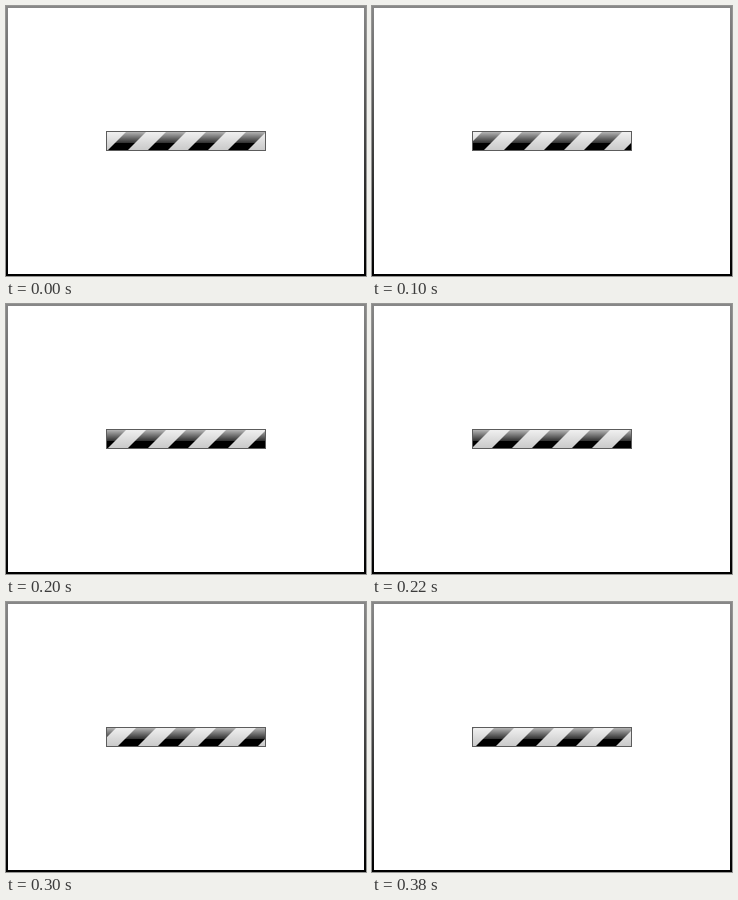
Recreate the animation shown at these times as an HTML page with a canvas. Size 360 by 270 pixels, loop 400 ms.

```html
<!DOCTYPE html>
<html>
<head>
<meta charset="utf-8">
<style>
html, body { margin: 0; width: 100%; height: 100%; overflow: hidden; background: #fff; }
canvas { display: block; }
</style>
</head>
<body>
<canvas id="stage" width="360" height="270"></canvas>
<script>
const ctx = document.getElementById('stage').getContext('2d');
const LOOP = 400, STEP = 20, PERIOD = 40;
const bar = { x: 100, y: 125, w: 160, h: 20 };

function vertical(y0, y1, ...stops) {
  const gradient = ctx.createLinearGradient(0, y0, 0, y1);
  for (const [at, color] of stops) gradient.addColorStop(at, color);
  return gradient;
}

const frameFill = vertical(0, 270, [0, '#888'], [1, '#000']);
const lightFill = vertical(126, 144, [0, '#f0f0f0'], [0.6, '#d8d8d8'], [1, '#cacaca']);
const darkFill = vertical(126, 144, [0, '#b4b4b4'], [0.61, '#303030'], [0.61, '#000'], [1, '#000']);

function fillRect(color, x, y, w, h) {
  ctx.fillStyle = color;
  ctx.fillRect(x, y, w, h);
}

function draw(time) {
  const shift = Math.floor((time % LOOP) / STEP) * STEP * PERIOD / LOOP;
  fillRect(frameFill, 0, 0, 360, 270);
  fillRect('#fff', 2, 2, 356, 266);
  fillRect('#5c5c5c', bar.x, bar.y, bar.w, bar.h);

  ctx.save();
  ctx.beginPath();
  ctx.rect(bar.x + 1, bar.y + 1, bar.w - 2, bar.h - 2);
  ctx.clip();
  fillRect(lightFill, bar.x, bar.y, bar.w, bar.h);
  ctx.fillStyle = darkFill;
  ctx.beginPath();
  for (let x = bar.x + 1 - shift; x < bar.x + bar.w; x += PERIOD) {
    ctx.moveTo(x, 145);
    ctx.lineTo(x + 20, 145);
    ctx.lineTo(x + 40, 125);
    ctx.lineTo(x + 20, 125);
    ctx.closePath();
  }
  ctx.fill();
  ctx.restore();
}

function tick() {
  draw(performance.now());
  requestAnimationFrame(tick);
}
tick();
</script>
</body>
</html>
```
